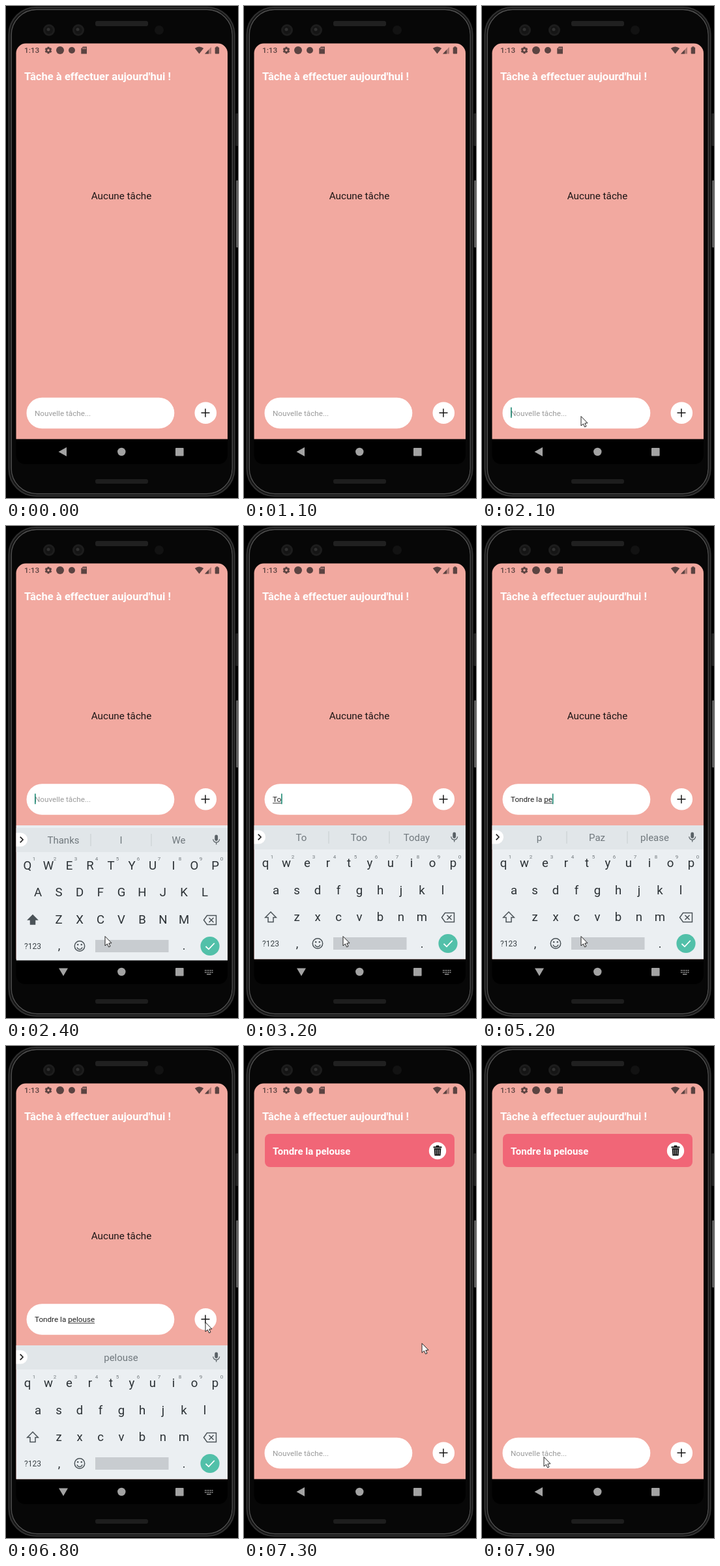
Animation, 356 px wide and 756 px high, one loop 8 s. Source, as an HTML page with a canvas:

```html
<!DOCTYPE html>
<html lang="fr">
<head>
<meta charset="utf-8">
<style>
html, body { margin: 0; width: 100%; height: 100%; overflow: hidden; background: #000; }
canvas { display: block; width: 356px; height: 756px; }
</style>
</head>
<body>
<canvas id="stage"></canvas>
<script>
const W = 356, H = 756, LOOP = 8000;
const canvas = document.getElementById('stage');
const ctx = canvas.getContext('2d');
const dpr = window.devicePixelRatio || 1;
canvas.width = W * dpr;
canvas.height = H * dpr;

const PINK = '#f2a9a0', INK = '#2b3135', STATUS = '#5b4341', NAV = '#a3a3a3', KEY = '#4b5358';
const SCREEN = { x: 15.5, y: 57.5, w: 324.5, h: 608 };
const TASK = 'Tondre la pelouse';
const FIRST_KEY = 2900, KEY_GAP = 205;
const FOCUS = 2050, OPEN = 2200, RESIZE = 2300, SUBMIT = 7000, CLOSED = 7200;

// Suggestions by number of typed characters
const HINTS = [
  'Thanks,I,We', 'T,The,To', 'To,Too,Today', 'Ton,Tons,Tonight', 'Tond,Tone,Tons',
  'Tondr,Tone,Tons', 'Tondre,Tender,Tone', 'I,The,We', 'l,like,love', 'la,last,late',
  'I,The,We', 'p,Paz,please', 'pe,people,per', 'pel,people,pelvic', 'pelo,people,pelt',
  'pelou,people,pelt', 'pelous,people,pelt', ',pelouse,'
];

const clamp = v => Math.max(0, Math.min(1, v));
const progress = (t, a, b) => clamp((t - a) / (b - a));
const smooth = p => p * p * (3 - 2 * p);
const mix = (a, b, p) => a + (b - a) * p;

function box(x, y, w, h, r, fill) {
  ctx.beginPath();
  ctx.roundRect(x, y, w, h, r);
  if (fill) { ctx.fillStyle = fill; ctx.fill(); }
}

function outline(x, y, w, h, r, color, width) {
  box(x, y, w, h, r);
  ctx.strokeStyle = color;
  ctx.lineWidth = width;
  ctx.stroke();
}

function disc(x, y, r, fill) {
  ctx.beginPath();
  ctx.arc(x, y, r, 0, Math.PI * 2);
  ctx.fillStyle = fill;
  ctx.fill();
}

function path(points, fill, stroke, width = 1, close = true) {
  ctx.beginPath();
  points.forEach(([x, y]) => ctx.lineTo(x, y));
  if (close) ctx.closePath();
  if (fill) { ctx.fillStyle = fill; ctx.fill(); }
  if (stroke) { ctx.strokeStyle = stroke; ctx.lineWidth = width; ctx.stroke(); }
}

function text(str, x, y, size, color, align = 'left', weight = 400) {
  ctx.font = `${weight} ${size}px Roboto, sans-serif`;
  ctx.textAlign = align;
  ctx.fillStyle = color;
  ctx.fillText(str, x, y);
}

function drawPhone() {
  ctx.fillStyle = '#000';
  ctx.fillRect(0, 0, W, H);
  box(352.5, 165, 4, 50, 1, '#242424');
  box(353, 268, 4, 103, 1, '#5c5c5c');
  box(3, 1, 349, 753, 43, '#141414');
  outline(4.5, 2, 346, 751, 42, '#303030', 2);
  outline(8.2, 5.5, 339, 744, 39, '#505050', 1.4);
  box(9, 6.5, 337.4, 742, 38, '#070707');
  box(137, 23, 81, 8, 3, '#202020');
  box(137, 727, 81, 7, 3, '#1d1d1d');
  for (const x of [66, 111]) {
    disc(x, 37, 9, '#1d1d1d');
    disc(x, 37, 6, '#151515');
    disc(x - 1, 36, 2.5, '#303030');
  }
  disc(235, 37, 7, '#121212');
  box(SCREEN.x, 640, SCREEN.w, 64, [0, 0, 14, 14], '#000');
  box(SCREEN.x, SCREEN.y, SCREEN.w, SCREEN.h, [15, 15, 0, 0], PINK);
}

function drawStatus() {
  text('1:13', 28, 72, 11.8, STATUS, 'left', 500);
  ctx.save();
  ctx.translate(65, 68);
  ctx.fillStyle = STATUS;
  for (let i = 0; i < 6; i++) {
    ctx.rotate(Math.PI / 3);
    ctx.fillRect(-1.5, -5.3, 3, 4);
  }
  ctx.restore();
  ctx.beginPath();
  ctx.arc(65, 68, 3, 0, Math.PI * 2);
  ctx.strokeStyle = STATUS;
  ctx.lineWidth = 2.4;
  ctx.stroke();
  disc(65, 68, 1.7, PINK);
  disc(83, 68, 6, STATUS);
  disc(101, 68, 5, STATUS);
  path([[118, 62.5], [124, 62.5], [124, 73.5], [115.3, 73.5], [115.3, 65.5]], STATUS);
  ctx.fillStyle = PINK;
  for (let i = 0; i < 3; i++) ctx.fillRect(117.6 + i * 2, 64, 0.9, 2.3);
  ctx.beginPath();
  ctx.moveTo(296.5, 73.5);
  ctx.lineTo(289.8, 65);
  ctx.quadraticCurveTo(296.5, 60, 303.2, 65);
  ctx.closePath();
  ctx.fillStyle = STATUS;
  ctx.fill();
  path([[305, 73.5], [315, 73.5], [315, 63]], '#ad7a74');
  path([[305, 73.5], [311, 73.5], [311, 67.2]], STATUS);
  box(320.7, 63.5, 6.4, 10, 1, STATUS);
  ctx.fillRect(322.4, 62.3, 3, 2);
}

function drawField(t, y, typed, focused) {
  box(31.5, y - 23.5, 226.8, 47.5, 23.7, '#fff');
  disc(306.3, y, 16.8, '#fff');
  ctx.fillStyle = '#161616';
  ctx.fillRect(299.5, y - 0.8, 13, 1.5);
  ctx.fillRect(305.2, y - 6.5, 1.5, 13);

  const value = TASK.slice(0, typed), size = 11.7;
  if (typed) text(value, 44, y + 4.3, size, '#222');
  else text('Nouvelle tâche...', 44, y + 4.3, size, '#9b9b9b');
  if (!focused) return;

  const end = 44 + (typed ? ctx.measureText(value).width : 0);
  const word = value.slice(value.lastIndexOf(' ') + 1);
  if (word) {
    const w = ctx.measureText(word).width;
    ctx.fillStyle = '#333';
    ctx.fillRect(end - w, y + 5.6, w, 1);
  }
  const lastEdit = typed ? FIRST_KEY + (typed - 1) * KEY_GAP : FOCUS;
  if ((t - lastEdit) % 1000 < 500) {
    ctx.fillStyle = '#1d8a74';
    ctx.fillRect(end, y - 8.5, 1.6, 16);
  }
}

function drawTask() {
  box(32, 135, 291, 51, 8, '#f16677');
  text(TASK, 44, 166.5, 15, '#fff', 'left', 700);
  disc(297, 161, 13.2, '#fff');
  box(290.5, 154.5, 13, 2, 0.5, '#111');
  box(294.5, 152.8, 5, 2.2, 1, '#111');
  path([[291.6, 157.3], [302.4, 157.3], [301.6, 168.6], [292.4, 168.6]], '#111');
  ctx.fillStyle = '#ddd';
  for (let i = 0; i < 3; i++) ctx.fillRect(293.8 + i * 2.8, 159, 0.8, 7.6);
}

function drawHints(words) {
  const several = words[0] !== '';
  ctx.fillStyle = '#c8cdd0';
  if (several) for (const x of [130, 223]) ctx.fillRect(x - 0.5, 469, 1, 19);
  words.forEach((w, i) => text(w, [88, 176.5, 265][i], 484, 15, '#70787d', 'center'));
  box(SCREEN.x, 467.5, 17.5, 21, [0, 10.5, 10.5, 0], '#fff');
  path([[21.7, 473.7], [26, 478], [21.7, 482.3]], null, '#222', 1.7, false);
  box(320.3, 470.5, 4.8, 9.5, 2.4, '#596166');
  ctx.strokeStyle = '#596166';
  ctx.lineWidth = 1.3;
  ctx.beginPath();
  ctx.arc(322.7, 477.3, 4.9, 0, Math.PI);
  ctx.moveTo(322.7, 482);
  ctx.lineTo(322.7, 485.5);
  ctx.stroke();
}

function drawKeys(upper) {
  const rows = [['qwertyuiop', 33, 524], ['asdfghjkl', 49, 565.5], ['zxcvbnm', 81, 607]];
  for (const [letters, x0, y] of rows) {
    [...letters].forEach((c, i) => {
      text(upper ? c.toUpperCase() : c, x0 + i * 32, y, 18.6, INK, 'center');
    });
  }
  for (let i = 0; i < 10; i++) {
    text((i + 1) % 10, 43 + i * 32, 510.5, 8, '#70777b', 'center');
  }
  const shift = [[41, 593], [49.3, 601.5], [45, 601.5], [45, 608.5], [37, 608.5], [37, 601.5], [32.7, 601.5]];
  path(shift, upper ? KEY : null, KEY, upper ? 0.5 : 1.5);

  path([[308.5, 594.5], [322.5, 594.5], [322.5, 608.5], [308.5, 608.5], [303.5, 601.5]], null, KEY, 1.5);
  path([[311.5, 598], [318.5, 605]], null, KEY, 1.5);
  path([[318.5, 598], [311.5, 605]], null, KEY, 1.5);

  text('?123', 41, 646, 12, '#3b4347', 'center');
  text(',', 81.5, 647.5, 18, INK, 'center');
  text('.', 273, 647.5, 18, INK, 'center');
  ctx.strokeStyle = KEY;
  ctx.lineWidth = 1.5;
  ctx.beginPath();
  ctx.arc(113, 641.5, 7.7, 0, Math.PI * 2);
  ctx.stroke();
  ctx.beginPath();
  ctx.arc(113, 642.5, 4, 0.2, Math.PI - 0.2);
  ctx.stroke();
  disc(110.2, 639.3, 1.2, KEY);
  disc(115.8, 639.3, 1.2, KEY);
  ctx.fillStyle = '#c8ccd0';
  ctx.fillRect(137, 632, 112.5, 19);
  disc(313, 641.5, 14.6, '#52c0a9');
  path([[306.5, 642], [311, 646.3], [319.8, 637]], null, '#fff', 1.8, false);
}

// The panel leads the keys slightly while it settles
function drawKeyboard(offset, typed, hints) {
  const lead = Math.max(0, offset - 4);
  const bottom = SCREEN.y + SCREEN.h + Math.min(2, offset);
  ctx.save();
  ctx.beginPath();
  ctx.rect(SCREEN.x, 460, SCREEN.w, bottom - 460);
  ctx.clip();
  ctx.fillStyle = '#ebeff2';
  ctx.fillRect(SCREEN.x, 460 + lead, SCREEN.w, 210);
  ctx.fillStyle = '#e1e6e9';
  ctx.fillRect(SCREEN.x, 460 + offset, SCREEN.w, 37);
  ctx.translate(0, offset);
  drawHints(HINTS[hints].split(','));
  drawKeys(typed === 0);
  ctx.restore();
}

function drawNav(open) {
  if (open) {
    path([[81, 679.5], [95, 679.5], [88, 691.5]], NAV);
    for (let i = 0; i < 10; i++) {
      box(305 + (i % 5) * 2.7, 682 + Math.floor(i / 5) * 3, 1.7, 1.7, 0, '#929292');
    }
    box(308, 688, 6.5, 1.5, 0, '#929292');
  } else {
    path([[80.5, 685], [93, 678], [93, 692]], NAV);
  }
  disc(177.3, 685, 6.2, NAV);
  box(260, 679, 12.6, 12.6, 1, NAV);
}

function drawCursor(x, y) {
  const shape = [[0, 0], [0, 14.5], [3.4, 11.5], [5.6, 16.4], [8, 15.3], [5.8, 10.6], [10, 10.3]];
  path(shape.map(([a, b]) => [x + a, y + b]), '#fff', '#222', 1);
}

function cursorAt(t) {
  const stops = [[1500, 358, 700], [1900, 152, 630.5], [6250, 152, 630.5], [6700, 306, 424.5],
    [7150, 306, 424.5], [7750, 95, 631.5], [LOOP, 95, 631.5]];
  const i = stops.findIndex(s => t < s[0]);
  if (i < 1) return null;
  const [a, b] = [stops[i - 1], stops[i]];
  const p = smooth(progress(t, a[0], b[0]));
  return [mix(a[1], b[1], p), mix(a[2], b[2], p)];
}

const typedAt = t => Math.max(0, Math.min(TASK.length, Math.floor((t - FIRST_KEY) / KEY_GAP) + 1));

function draw(t) {
  ctx.setTransform(dpr, 0, 0, dpr, 0, 0);
  const done = t >= SUBMIT;
  const raised = t >= RESIZE && t < SUBMIT + 100;
  const open = t >= OPEN && t < CLOSED;
  const typed = done ? 0 : typedAt(t);

  drawPhone();
  drawStatus();
  text("Tâche à effectuer aujourd'hui !", 28, 114, 16.6, '#fff', 'left', 700);
  if (done) drawTask();
  else text('Aucune tâche', 177, 297, 15.25, '#1c1616', 'center');
  drawField(t, raised ? 419.8 : 625.2, typed, t >= FOCUS && !done);
  if (open) {
    const drop = done
      ? progress(t, SUBMIT, CLOSED) ** 2
      : (1 - progress(t, OPEN, 2440)) ** 2.2;
    drawKeyboard(206 * drop, typed, done ? 0 : typedAt(t - 80));
  }
  drawNav(open);
  const cursor = cursorAt(t);
  if (cursor) drawCursor(...cursor);
}

let start = null;
function tick(now) {
  if (start === null) start = now;
  draw((now - start) % LOOP);
  requestAnimationFrame(tick);
}
draw(0);
requestAnimationFrame(tick);
</script>
</body>
</html>
```
